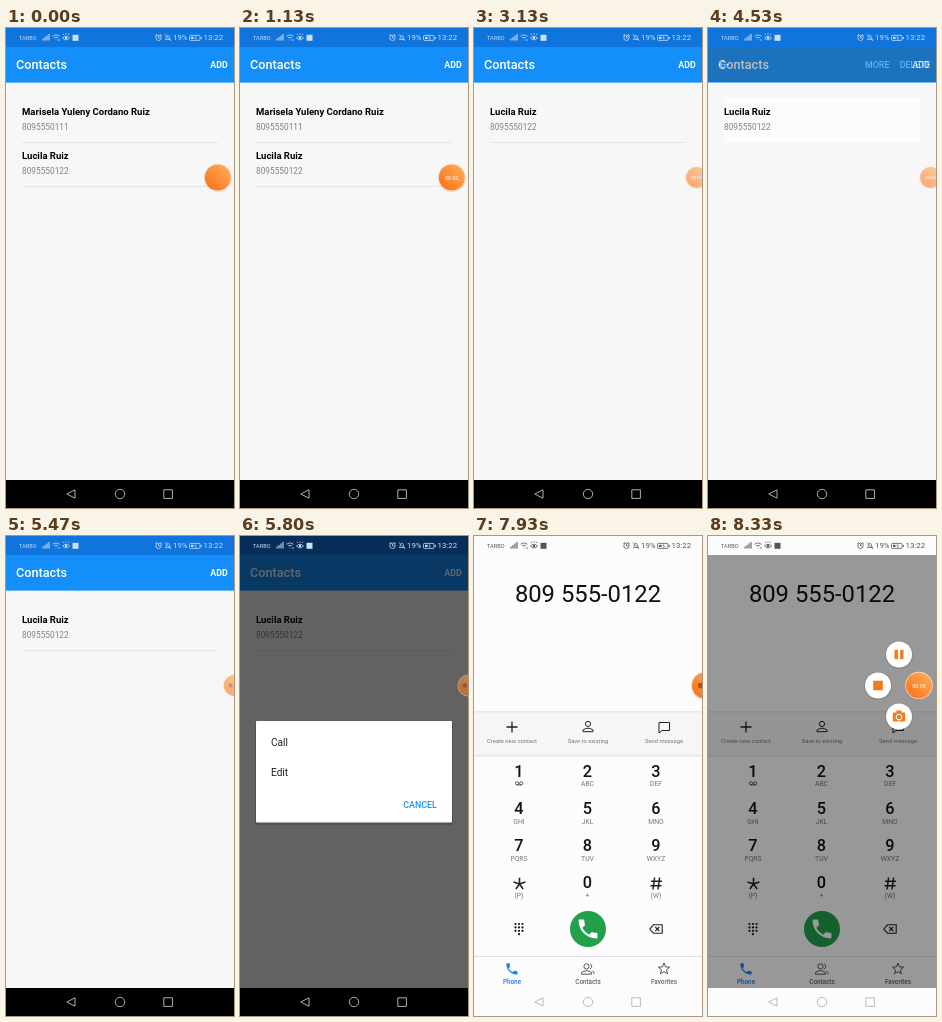
An HTML page that plays this animation: 228 by 480 pixels, repeating every 8.67 s.

```html
<!DOCTYPE html>
<html lang="en">
<head>
<meta charset="utf-8">
<title>Contacts</title>
<style>
  html, body { margin: 0; width: 100%; height: 100%; overflow: hidden; }
  svg { display: block; width: 228px; height: 480px; font-family: Roboto, sans-serif; }
  .line { fill: none; stroke: currentColor; }
</style>
</head>
<body>
<svg id="stage" viewBox="0 0 228 480"></svg>
<script>
const LOOP = 8670;
const PHONE = 'M6.6 10.8c1.4 2.8 3.8 5.1 6.6 6.6l2.2-2.2c.3-.3.7-.4 1-.2 1.1.4 2.3.6 3.6.6.6 0 1 .4 1 1V20c0 .6-.4 1-1 1C10.6 21 3 13.4 3 4c0-.6.4-1 1-1h3.5c.6 0 1 .4 1 1 0 1.2.2 2.4.6 3.6.1.4 0 .7-.2 1z';

// y is the vertical middle of the capitals; baselines sit on whole pixels
const text = (x, y, size, label, fill = 'currentColor', weight = 400, anchor = 'start', id = '') =>
  `<text ${id && `id="${id}"`} x="${x}" y="${Math.round(y + size * 0.35)}" font-size="${size}" fill="${fill}" font-weight="${weight}" text-anchor="${anchor}">${label}</text>`;
const mid = (x, y, size, label, fill, weight, id) => text(x, y, size, label, fill, weight, 'middle', id);
const rect = (x, y, w, h, fill, extra = '') =>
  `<rect x="${x}" y="${y}" width="${w}" height="${h}" fill="${fill}" ${extra}/>`;
const circle = (x, y, r, fill, extra = '') => `<circle cx="${x}" cy="${y}" r="${r}" fill="${fill}" ${extra}/>`;
const line = (d, width = 1, extra = '') => `<path class="line" d="${d}" stroke-width="${width}" ${extra}/>`;
const group = (id, body, extra = '') => `<g id="${id}" ${extra}>${body}</g>`;

const contact = (id, name, number) => group(id,
  rect(16, 70, 196, 44, '#fcfcfc', `id="${id}Press"`) +
  text(16, 83.5, 9.5, name, '#000', 700) +
  text(16, 99.5, 8.3, number, '#808080') +
  rect(16, 114, 196, 0.7, '#dededf', `id="${id}Rule"`));

const statusIcons =
  text(13, 9.8, 5.6, 'TARBO') +
  line('M37 12.5V10.5M39 12.5V9M41 12.5V7.5M43 12.5V6', 1.1) +
  line('M46.5 8.2Q50 5.4 53.5 8.2M48 10Q50 8.5 52 10M50 11.5V12.3M52 12H54', 0.8) +
  line('M56.5 10Q60 6.5 63.5 10Q60 13.8 56.5 10ZM58 7L57 5.8M60 6.6V5.2M62 7L63 5.8', 0.8) +
  circle(60, 10, 1.2, 'currentColor') +
  rect(66.5, 6.8, 6, 6, 'currentColor') +
  circle(152.5, 9.8, 2.7, 'none', 'class="line" stroke-width=".8"') +
  line('M152.5 8V10H154M149.3 7.7L151 6.3M155.7 7.7L154 6.3', 0.8) +
  line('M159.3 11.5H164.5L163.6 10.3V8.8Q161.9 5.5 160.2 8.8V10.3ZM158.8 6.3L165 13', 0.7) +
  text(167, 9.5, 7.8, '19%') +
  rect(183.5, 7.4, 10.5, 5, 'none', 'class="line" stroke-width=".8" rx="1"') +
  rect(185, 8.8, 2.5, 2.2, 'currentColor') + line('M195.3 8.9V11', 1) +
  line('M189.8 8.1L188.8 10H190.5L189.6 11.8', 0.6) +
  text(197.6, 9.5, 7.8, '13:22');

const navIcons = line('M69 461.8V470.2L60.8 466ZM157.8 461.8H166.4V470.4H157.8Z', 1) +
  circle(114, 466, 4.7, 'none', 'class="line"');

const actionBar = rect(0, 19, 228, 35, '#303030') +
  line('M21 36.7H12M16 32.3L11.6 36.7L16 41.1', 1.3) +
  text(157, 37, 8.87, 'MORE', '#fff', 500) + text(191.7, 37, 8.87, 'DELETE', '#fff', 500);

const dialog = rect(0, 0, 228, 452, '#000', 'opacity=".6"') +
  rect(15, 186, 198, 103, '#000', 'opacity=".15" rx="2"') +
  rect(16, 185, 196, 101.5, '#fff', 'rx="1"') +
  text(31, 206, 10.13, 'Call', '#222') + text(31, 236.5, 10.13, 'Edit', '#222') +
  text(163.3, 269, 8.87, 'CANCEL', '#1890ff', 500);

const keys = [['1', ''], ['2', 'ABC'], ['3', 'DEF'], ['4', 'GHI'], ['5', 'JKL'], ['6', 'MNO'],
  ['7', 'PQRS'], ['8', 'TUV'], ['9', 'WXYZ'], ['', '(P)'], ['0', '+'], ['', '(W)']];
const keypad = keys.map(([digit, letters], i) => {
  const x = 45 + (i % 3) * 68.5, y = 234.8 + Math.floor(i / 3) * 37.3;
  return mid(x, y, 16.3, digit, '#111', 500) + mid(x, y + 13.2, 6.8, letters, '#777');
}).join('');
const person = (x, y) => circle(x, y - 2.6, 2.6, 'none', 'class="line"') +
  line(`M${x - 5} ${y + 5.2}V${y + 3.5}Q${x} ${y - 0.2} ${x + 5} ${y + 3.5}V${y + 5.2}Z`);
const dots = Array.from({ length: 10 }, (_, i) =>
  circle(41.5 + (i === 9 ? 1 : i % 3) * 3.5, 388 + Math.floor(i / 3) * 3.4, 1.1, '#111')).join('');
const polar = (x, y, r, turn) =>
  `${x + r * Math.sin(turn * 2 * Math.PI)} ${y - r * Math.cos(turn * 2 * Math.PI)}`;
const star = Array.from({ length: 10 }, (_, i) => polar(190, 433, i % 2 ? 2.6 : 6, i / 10)).join('L');
const asterisk = Array.from({ length: 5 }, (_, i) => `M45.5 348L${polar(45.5, 348, 6.2, i / 5)}`).join('');

const dialer = rect(0, 0, 228, 480, '#fcfcfc') +
  rect(0, 176, 228, 44, '#f6f6f6') +
  mid(114, 57.6, 23.8, '809 555-0122', '#111') +
  [175.5, 219.5, 420].map(y => rect(0, y, 228, 0.8, '#d8d8d8')).join('') +
  line('M32.5 191H43.5M38 185.5V196.5', 1.3) + person(114, 190.5) +
  line('M185 186.5H195.5V194.5H188L185 197Z') +
  mid(38, 204.5, 5.8, 'Create new contact', '#777') +
  mid(114, 204.5, 5.8, 'Save to existing', '#777') +
  mid(190, 204.5, 5.8, 'Send message', '#777') +
  keypad +
  circle(43, 247.3, 1.6, 'none', 'class="line" stroke-width=".7"') +
  circle(47.2, 247.3, 1.6, 'none', 'class="line" stroke-width=".7"') + line('M43 248.9H47.2', 0.7) +
  line(asterisk, 1.6) +
  line('M180.6 341.5L179 353.5M185.6 341.5L184 353.5M177 345.3H188M176.5 349.7H187.5', 1.5) +
  dots + circle(114, 393, 18, '#22a04c') +
  `<path d="${PHONE}" fill="#fff" transform="translate(101.4 380.4) scale(1.05)"/>` +
  line('M179.5 388.8H188.2V397.2H179.5L175.8 393ZM181.3 391L185.3 395M185.3 391L181.3 395', 1.1) +
  `<path d="${PHONE}" fill="#1a80f0" transform="translate(30.5 425.5) scale(.62)"/>` +
  group('tabs', person(112.5, 433) + line('M116 427.8Q119.5 430.4 116 433M118.5 434.8Q120 436 120 438.2') +
    line(`M${star}Z`), 'color="#555"') +
  mid(38, 445.8, 6.33, 'Phone', '#1a80f0', 500) + mid(114, 445.8, 6.33, 'Contacts', '#666', 500) +
  mid(190, 445.8, 6.33, 'Favorites', '#666', 500);

const shadow = circle(0, 0.6, 14, '#000', 'opacity=".1"');
const menuItem = (id, icon) => group(id, shadow + circle(0, 0, 13, '#fff') + icon);
const menu = rect(0, 19, 228, 433, '#000', 'opacity=".4"') +
  menuItem('pause', rect(-4.5, -4.7, 3.4, 9.4, '#f47a20') + rect(1.1, -4.7, 3.4, 9.4, '#f47a20')) +
  menuItem('stop', rect(-4.8, -4.8, 9.6, 9.6, '#f47a20')) +
  menuItem('camera', rect(-6.2, -4, 12.4, 9, '#f47a20', 'rx="1"') + rect(-2.6, -6, 5.2, 3, '#f47a20') +
    circle(0, 0.6, 2.8, '#f47a20', 'stroke="#fff" stroke-width="1.1"'));

const gradient = `<linearGradient id="orange" x1="0" y1="1" x2="1" y2="0">
  <stop stop-color="#f96d12"/><stop offset="1" stop-color="#ffb160"/></linearGradient>`;

document.getElementById('stage').innerHTML = gradient +
  rect(0, 0, 228, 480, '#f7f7f8') + rect(0, 452, 228, 28, '#000') +
  rect(0, 0, 228, 19, '#0f74dc') + rect(0, 19, 228, 35.6, '#148ffa') +
  text(10, 37, 12.66, 'Contacts', '#fff', 500) + text(204.3, 37, 8.87, 'ADD', '#fff', 700) +
  contact('first', 'Marisela Yuleny Cordano Ruiz', '8095550111') +
  contact('second', 'Lucila Ruiz', '8095550122') +
  group('bar', actionBar, 'color="#fff"') + group('dialog', dialog) +
  group('dialer', dialer, 'color="#222"') +
  group('status', statusIcons) + group('nav', navIcons) + group('menu', menu) +
  group('bubble', shadow + circle(0, 0, 13.7, '#fbe3d2') + circle(0, 0, 13, 'url(#orange)') +
    mid(0, 0, 5.4, '', '#fff', 400, 'timer') + circle(-4.5, 0, 2.7, '#c94400', 'id="dot"'));

const el = id => document.getElementById(id);
const fade = (id, opacity) => {
  el(id).style.opacity = opacity;
  el(id).style.display = opacity > 0 ? '' : 'none';
};
const place = (id, x, y, scale = 1) => el(id).setAttribute('transform', `translate(${x} ${y}) scale(${scale})`);
const mix = (a, b, k) => a + (b - a) * k;

function draw(t) {
  const ease = (from, to) => (1 - Math.cos(Math.PI * Math.min(1, Math.max(0, (t - from) / (to - from))))) / 2;
  const pulse = (a, b, c, d) => ease(a, b) - ease(c, d);

  const deleted = t >= 2930;
  fade('first', deleted ? 0 : 1);
  place('second', 0, deleted ? 0 : 44);
  const pressFirst = pulse(1130, 1270, 2000, 2250), pressSecond = pulse(3980, 4130, 4650, 4800);
  fade('firstPress', pressFirst);
  fade('secondPress', pressSecond);
  fade('firstRule', 1 - pressFirst);
  fade('secondRule', 1 - pressSecond);

  fade('bar', pulse(1530, 1830, 2820, 3070) + pulse(4420, 4720, 5270, 5480));
  fade('dialog', pulse(5500, 5780, 6450, 6660));
  const calling = ease(6900, 7070);
  fade('dialer', calling);
  el('status').style.color = calling > 0.5 ? '#555' : '#cbdff7';
  el('nav').style.color = calling > 0.5 ? '#bbb' : '#b0b0b0';

  const open = ease(8040, 8130);
  fade('menu', open);
  place('pause', mix(211, 191, open), mix(149.5, 118.5, open));
  place('stop', mix(211, 170, open), 149.5);
  place('camera', mix(211, 191, open), mix(149.5, 180.5, open));

  const tuck = ease(2800, 3050), hide = ease(5300, 5500), wake = ease(7870, 7930);
  const x = 211.8 + 10.7 * tuck + 6 * hide + 2.5 * wake;
  place('bubble', mix(x, 211, open), 149.5, mix(mix(1, 0.8, tuck), 1, wake));
  fade('bubble', mix(mix(1, 0.6, tuck), 1, wake));
  fade('dot', hide - open);
  fade('timer', ease(70, 200) - hide + open);
  el('timer').textContent = '00:0' + Math.max(0, Math.floor((t - 265) / 1000));
}

const start = performance.now();
function tick() {
  draw((performance.now() - start) % LOOP);
  requestAnimationFrame(tick);
}
tick();
</script>
</body>
</html>
```
